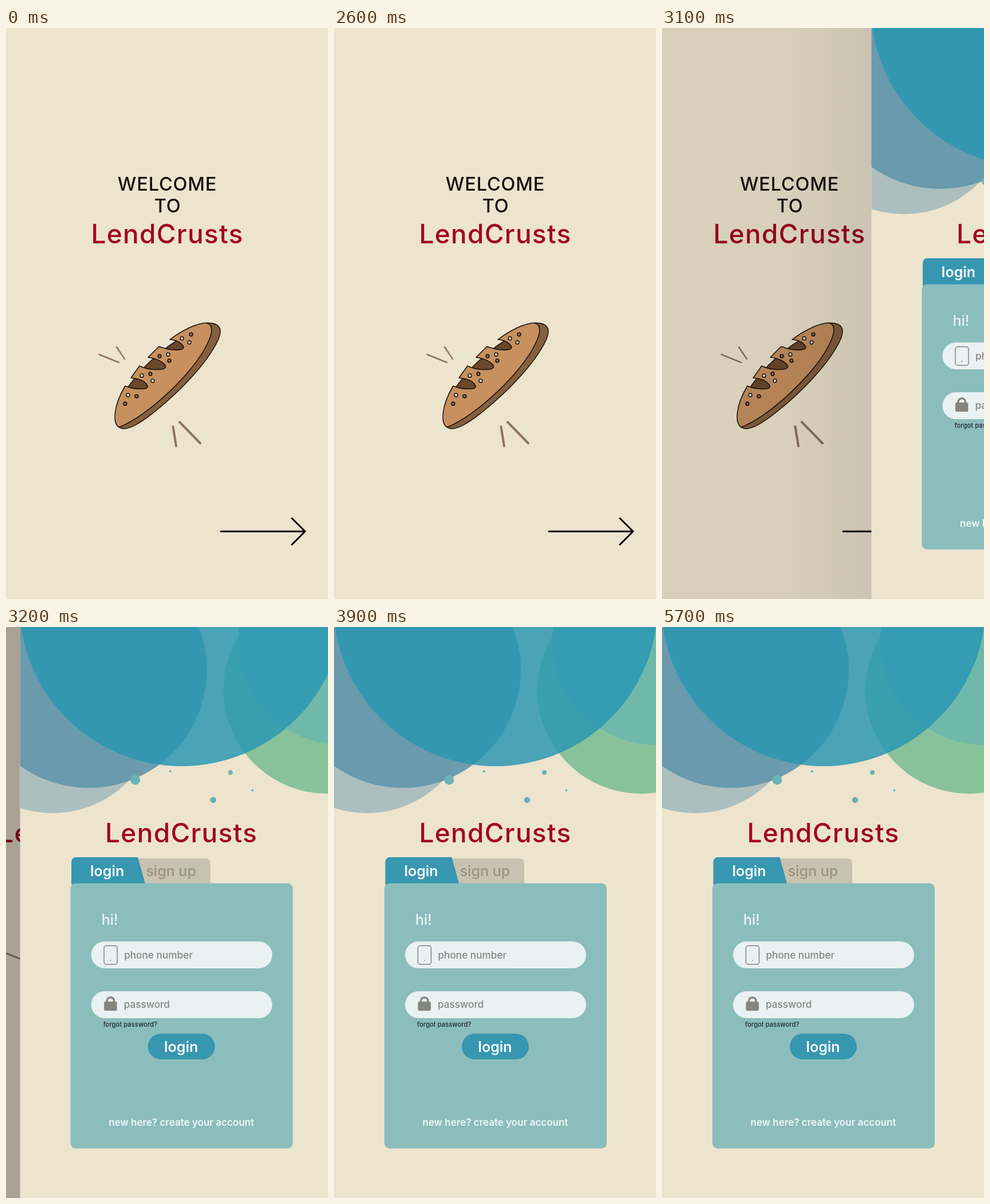
Recreate the animation shown at these times as an HTML page. Size 562x997 px, loop 5800 ms.

```html
<!DOCTYPE html>
<html lang="en">
<head>
<meta charset="utf-8">
<title>Welcome and login</title>
<style>
  html, body { margin: 0; width: 100%; height: 100%; overflow: hidden; background: #ede4ce; }
  svg { display: block; width: 100%; height: 100%; }
  text { font-family: Inter, "Open Sans", sans-serif; font-weight: 500; }
  .mid { text-anchor: middle; }
  .brand { font-size: 46px; letter-spacing: 1.3px; fill: #a0061e; }
  .hello { font-size: 32.5px; letter-spacing: .8px; fill: #14110d; }
  .big { font-size: 25px; }
  .field { font-size: 17.2px; fill: #85857f; }
  .bold { font-weight: 600; }
  .ink { stroke: #17100a; stroke-width: 1.5; stroke-linejoin: round; }
  .line { fill: none; stroke-linecap: round; stroke-linejoin: round; }
</style>
</head>
<body>
<svg viewBox="0 0 562 997" preserveAspectRatio="none">
  <defs>
    <linearGradient id="edge">
      <stop offset="0" stop-opacity="0"/>
      <stop offset="1" stop-opacity=".06"/>
    </linearGradient>
  </defs>

  <g id="welcome">
    <rect width="562" height="997" fill="#ede4ce"/>
    <text class="mid hello" x="281.5" y="284">WELCOME</text>
    <text class="mid hello" x="282" y="322">TO</text>
    <text class="mid brand" x="281.5" y="376">LendCrusts</text>

    <g class="line" stroke="#8d7467">
      <path stroke-width="2.5" d="M162.500 570 197 584M193 557 207 578"/>
      <path stroke-width="4" d="M291.500 696 297 730M303 688 339 725"/>
    </g>
    <g class="ink">
      <path fill="#85603f" d="M197 697C210 706 235 690 262 668C300 637 350 588 370 545C378 527 375 514 350 515Z"/>
      <path fill="#6b472c" d="M213 627C235 595 270 560 318 534L318 570 240 640Z"/>
      <path fill="#c6905f" d="M197 697C186 690 187 660 208 625Q222 631 240 630Q250 629 246 623Q240 613 218 611L233 590Q250 598 270 596Q281 595 278 589Q270 578 248 575L267 556Q285 563 302 562Q313 560 309 555Q302 545 286 544C310 526 335 515 350 515C362 517 361 532 352 550C330 600 245 680 197 697Z"/>
      <g id="seeds"></g>
    </g>
    <path class="line" stroke="#0c0a0c" stroke-width="3" d="M375 879H522M499 856 522 879 499 902"/>
  </g>

  <g id="shade">
    <rect id="dim" width="562" height="997"/>
    <rect id="shadow" width="160" height="997" fill="url(#edge)"/>
  </g>

  <g id="login">
    <rect width="562" height="997" fill="#ede4ce"/>
    <svg width="562" height="997">
      <circle cx="57" cy="141" r="184" fill="#acbfbe"/>
      <circle cx="120" cy="75" r="206" fill="#6598ad" opacity=".94"/>
      <circle cx="536" cy="110" r="181" fill="#87c29a"/>
      <circle cx="562" cy="25" r="181" fill="#70b9aa"/>
      <circle cx="282" cy="-40" r="283" fill="#2997b3" opacity=".83"/>
    </svg>
    <g id="dots" fill="#6bb3b5"></g>
    <text class="mid brand" x="281.500" y="376">LendCrusts</text>

    <path fill="#c8c2b1" d="M190 404H323Q332 404 332 413V450H190Z"/>
    <path fill="#3796b0" d="M89.500 450V411Q89.500 402 98.500 402H205.500L218 447V450Z"/>
    <rect x="88" y="447.500" width="388" height="463" rx="9" fill="#8bbdbd"/>
    <text class="mid big bold" x="152" y="435" fill="#f7fbfa">login</text>
    <text class="mid big" x="263.500" y="435" fill="#98927f">sign up</text>
    <text class="big" x="142" y="520" fill="#e9f3f2">hi!</text>

    <g fill="#e9f1f2">
      <rect x="124" y="549" width="316" height="47" rx="23.500"/>
      <rect x="124" y="636" width="316" height="47" rx="23.500"/>
    </g>
    <rect x="146.500" y="556.500" width="23" height="32.500" rx="4" fill="none" stroke="#85857f" stroke-width="1.500"/>
    <circle cx="158" cy="582" r="1" fill="#85857f"/>
    <rect x="146.500" y="654" width="22.500" height="16" rx="2.500" fill="#85857f"/>
    <path class="line" stroke="#85857f" stroke-width="3.500" d="M151.500 655V652A6.300 6 0 0 1 164 652V655"/>
    <text class="field" x="181.500" y="579">phone number</text>
    <text class="field" x="181" y="665">password</text>
    <text x="145" y="698" font-size="11.300" fill="#20282a">forgot password?</text>

    <rect x="223" y="710" width="117" height="45" rx="22.500" fill="#3796b0"/>
    <text class="mid big bold" x="281" y="741.500" fill="#f7fbfa">login</text>
    <text class="mid bold" x="281.500" y="871" font-size="17" fill="#eff7f6">new here? create your account</text>
  </g>
</svg>
<script>
const LOOP = 5800, STEP = 100, WIDTH = 562;
const SLIDE_START = 3013, SLIDE_TIME = 216;
const PARALLAX = 0.3, DIM = 0.26;
const el = id => document.getElementById(id);

function addCircles(parent, list, attrs = {}) {
  for (const [cx, cy, r = 2.9] of list) {
    const circle = document.createElementNS("http://www.w3.org/2000/svg", "circle");
    for (const [key, value] of Object.entries({ cx, cy, r, ...attrs })) circle.setAttribute(key, value);
    parent.append(circle);
  }
}

addCircles(el("seeds"), [[213, 641], [237, 607], [256, 616], [283, 570], [307, 542], [320, 549]], { fill: "#f6eee2" });
addCircles(el("seeds"), [[228, 643], [208, 656], [252, 604], [268, 573], [285, 581], [323, 535]], { fill: "#8d6a4c" });
addCircles(el("dots"), [[201, 267, 8.5], [262, 252, 2], [367, 254, 4.2], [337, 302, 5.3], [405.5, 285, 2]]);

const easeInOut = u => (1 - Math.cos(Math.PI * Math.min(1, Math.max(0, u)))) / 2;
const shift = (id, x) => el(id).setAttribute("transform", `translate(${x} 0)`);

function render(time) {
  // The picture advances ten times a second.
  const t = Math.floor((time % LOOP) / STEP) * STEP;
  const p = easeInOut((t - SLIDE_START) / SLIDE_TIME);
  const edge = WIDTH * (1 - p);
  shift("welcome", -PARALLAX * WIDTH * p);
  shift("login", edge);
  shift("shadow", edge - 160);
  el("dim").setAttribute("opacity", DIM * p);
  el("shade").setAttribute("visibility", p > 0 ? "visible" : "hidden");
  el("login").setAttribute("visibility", p > 0 ? "visible" : "hidden");
}

const start = performance.now();
function tick() {
  render(performance.now() - start);
  requestAnimationFrame(tick);
}
tick();
</script>
</body>
</html>
```
